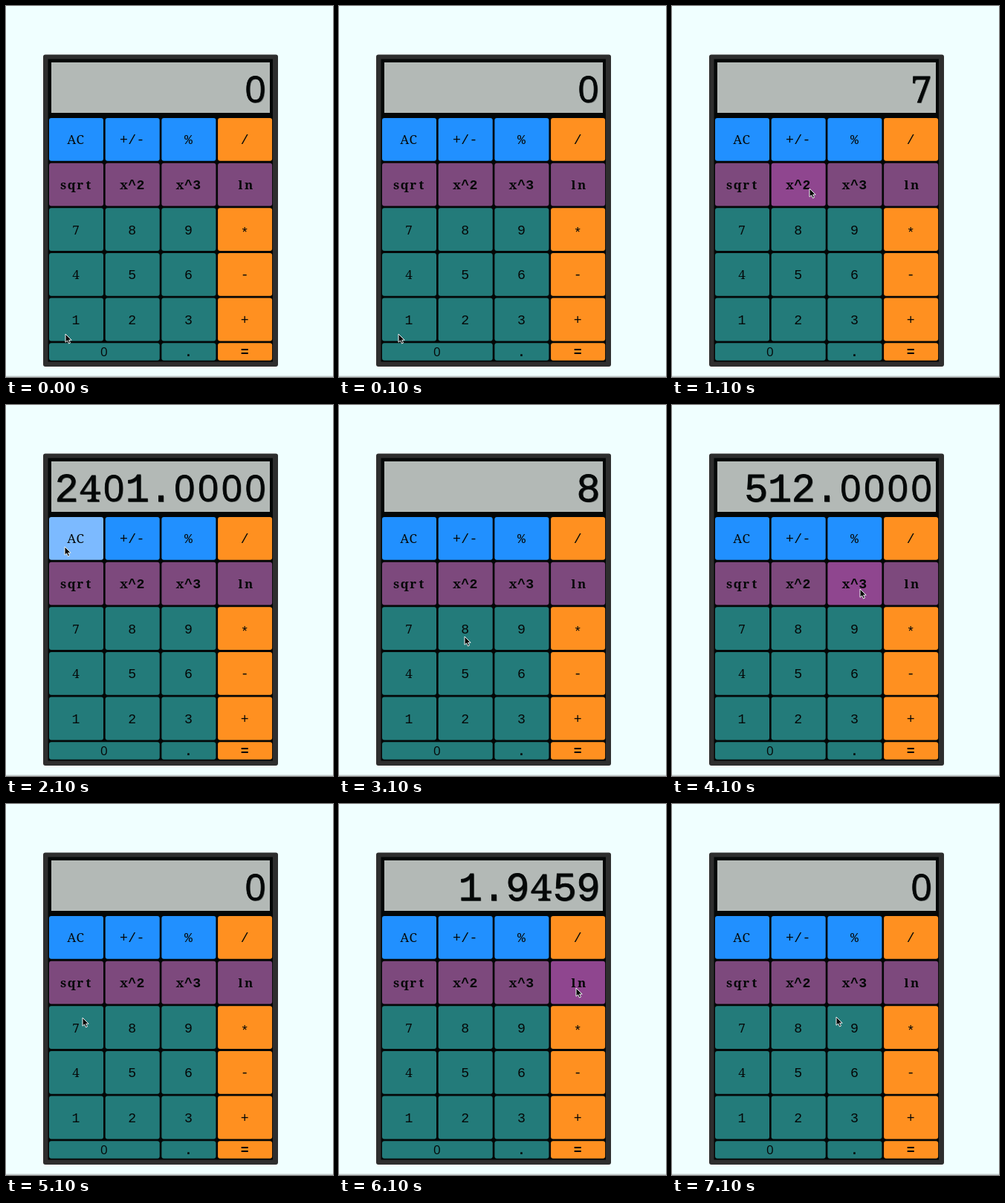
An HTML page that plays this animation: 440x500 px, repeating every 8 s.

```html
<!DOCTYPE html>
<html lang="en">
<head>
<meta charset="utf-8">
<title>Calculator</title>
<style>
  html, body { margin: 0; width: 100%; height: 100%; overflow: hidden; background: #f0ffff; }
  svg { display: block; }
  text { text-anchor: middle; }
</style>
</head>
<body>
<svg id="stage" width="440" height="500" viewBox="0 0 440 500">
  <rect width="440" height="500" fill="#f0ffff"/>
  <rect y="498.5" width="440" height="1.5" fill="#c3cbcb"/>
  <rect x="50" y="65.5" width="316" height="420.5" rx="3" fill="#2e2e2e"/>
  <rect x="56.5" y="71.5" width="302.5" height="408" fill="#040707"/>
  <rect x="61" y="76" width="294" height="68" fill="#b3b9b6"/>
  <g id="keys"></g>
  <g id="display"></g>
  <path id="cursor" d="M0 0V11.2L2.6 9L4.5 13L6.5 12L4.7 8.2H8.2Z"
    fill="#080808" stroke="#eef4f4" stroke-width="1" stroke-linejoin="round"/>
</svg>
<script>
const NS = 'http://www.w3.org/2000/svg';
const byId = id => document.getElementById(id);
const LOOP = 8000;
const BLUE = '#2190ff', ORANGE = '#ff9020', PURPLE = '#7d497d', TEAL = '#237b7a';
const HOVER = { [BLUE]: '#7cbaff', [PURPLE]: '#8f468f' };

const ROWS = [
  ['AC', '+/-', '%', '/'],
  ['sqrt', 'x^2', 'x^3', 'ln'],
  ['7', '8', '9', '*'],
  ['4', '5', '6', '-'],
  ['1', '2', '3', '+'],
  ['0', null, '.', '=']
];

// start time, display value, cursor tip, hovered key
const STEPS = [
  [0, '0', 80, 442],
  [100, '7', 185, 246, 'x^2'],
  [1100, '2401.0000', 79, 191, 'AC'],
  [2100, '8', 169, 312],
  [3100, '8', 169, 312],
  [4100, '512.0000', 253, 248, 'x^3'],
  [5100, '0', 103, 288],
  [6100, '1.9459', 319, 248, 'ln'],
  [7100, '0', 221, 287]
];
// the entry value holds for a second before the next reading
STEPS[1][0] = 1100; STEPS[2][0] = 2100; STEPS[3][0] = 3100;
STEPS.splice(4, 1);
STEPS.splice(1, 0, [100, '0', 80, 442]);

function add(parent, tag, attrs) {
  const el = document.createElementNS(NS, tag);
  for (const k in attrs) el.setAttribute(k, attrs[k]);
  parent.append(el);
  return el;
}

function fontOf(ch) {
  if (ch === '0') return ['"Open Sans", sans-serif', 1];
  if (/[a-zA-Z47]/.test(ch)) return ['"Noto Serif", serif', 1];
  return ['"Liberation Mono", monospace', 1.07];
}

// One text element, each character centred on a fixed pitch.
function monoText(parent, str, x, y, size, pitch, attrs) {
  const t = add(parent, 'text', { y, fill: '#050808', ...attrs });
  [...str].forEach((ch, i) => {
    const [family, k] = fontOf(ch);
    const span = add(t, 'tspan', { x: x + i * pitch, 'font-family': family, 'font-size': size * k });
    span.textContent = ch;
  });
  return t;
}

const keys = {};
ROWS.forEach((row, r) => row.forEach((label, c) => {
  if (!label) return;
  const last = r === 5, wide = label === '0';
  const x = 58 + c * 75.7, y = 151 + r * 60.65;
  const w = wide ? 148.7 : 73, h = last ? 23.5 : 57.8;
  const color = c === 3 && r !== 1 ? ORANGE : r === 0 ? BLUE : r === 1 ? PURPLE : TEAL;
  const box = add(byId('keys'), 'rect', { x, y, width: w, height: h, rx: 3, fill: color });
  keys[label] = { box, color };
  const pitch = 11.3;
  const start = x + w / 2 - 0.5 - (label.length - 1) * pitch / 2;
  const base = y + h / 2 + (label === '*' ? 10 : 6.3);
  const bold = r === 1 || label === '.' || label === '=';
  monoText(byId('keys'), label, start, base, 17, pitch, { 'font-weight': bold ? 700 : 400 });
}));

function show(value) {
  const g = byId('display'), pitch = 31.75;
  g.replaceChildren();
  const x = 335.5 - (value.length - 1) * pitch;
  monoText(g, value, x + 1, 130.8, 50, pitch, { opacity: 0.4 });
  monoText(g, value, x, 130, 50, pitch, { stroke: '#050808', 'stroke-width': 0.8 });
}

let current = null;
function draw(ms) {
  const step = STEPS.filter(s => s[0] <= ms).pop();
  if (step === current) return;
  current = step;
  const [, value, x, y, hover] = step;
  show(value);
  byId('cursor').setAttribute('transform', `translate(${x} ${y})`);
  for (const label in keys) {
    const { box, color } = keys[label];
    box.setAttribute('fill', label === hover ? HOVER[color] : color);
  }
}

const begin = performance.now();
function tick() {
  draw((performance.now() - begin) % LOOP);
  requestAnimationFrame(tick);
}
draw(0);
tick();
</script>
</body>
</html>
```
